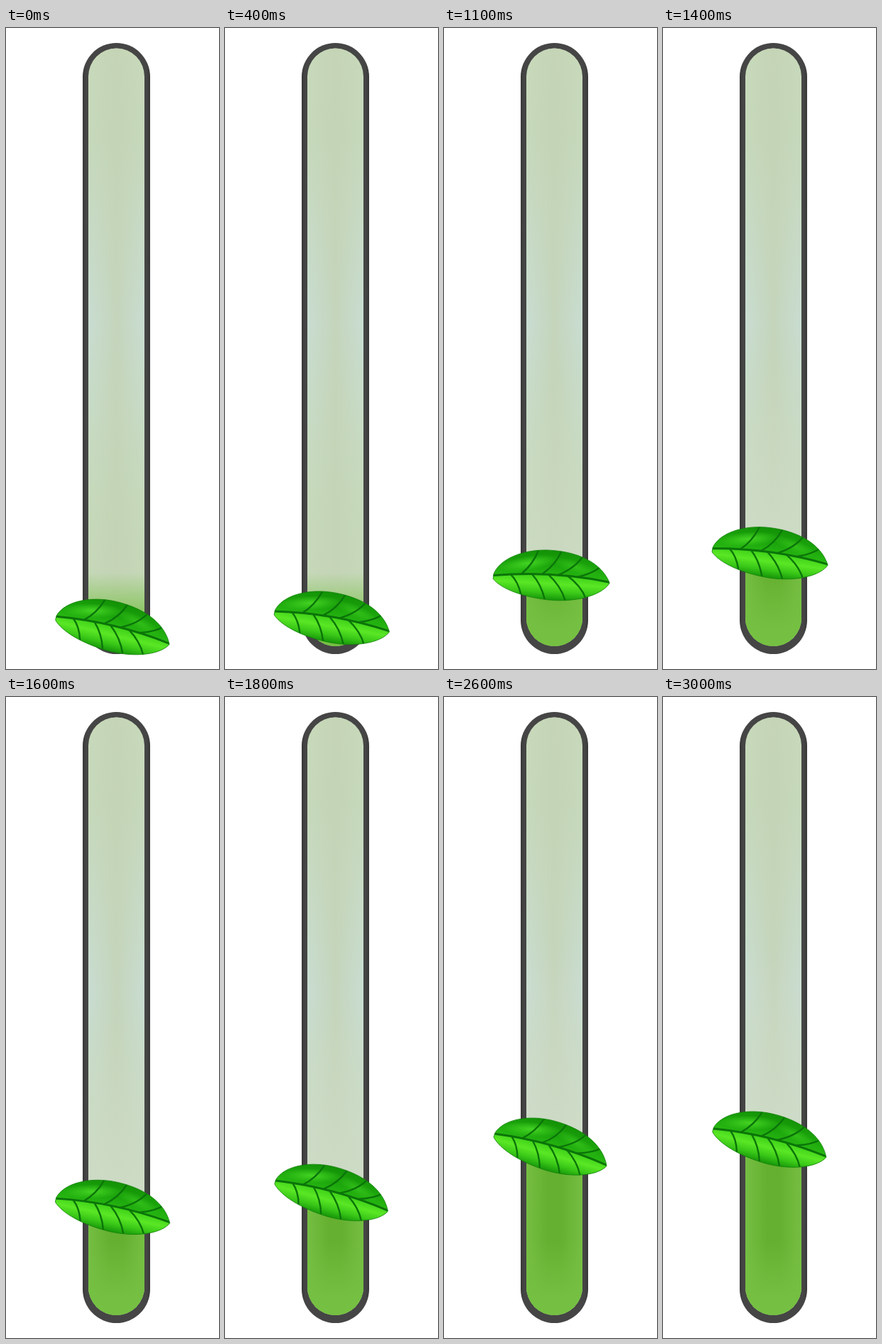
Recreate the animation shown at these times as an HTML page. Size 300 px wide and 900 px high, loop 4000 ms.

```html
<!DOCTYPE html>
<html lang="en">
<head>
<meta charset="utf-8">
<title>Leaf gauge</title>
<style>
html, body { margin: 0; width: 100%; height: 100%; overflow: hidden; background: #fff; }
svg { display: block; width: 300px; height: 900px; }
</style>
</head>
<body>
<svg viewBox="0 0 300 900">
  <defs>
    <linearGradient id="frame">
      <stop stop-color="#383838"/><stop offset=".05" stop-color="#454545"/>
      <stop offset=".95" stop-color="#454545"/><stop offset="1" stop-color="#383838"/>
    </linearGradient>
    <linearGradient id="glass" x2="0" y2="1">
      <stop stop-color="#c8dabb"/><stop offset=".15" stop-color="#c6d9bb"/>
      <stop offset=".46" stop-color="#c9ddd2"/>
      <stop offset=".75" stop-color="#c6dabb"/><stop offset="1" stop-color="#c3d6b4"/>
    </linearGradient>
    <linearGradient id="core">
      <stop stop-color="#c3d2b4" stop-opacity="0"/><stop offset=".5" stop-color="#c3d2b4" stop-opacity=".75"/>
      <stop offset="1" stop-color="#c3d2b4" stop-opacity="0"/>
    </linearGradient>
    <linearGradient id="haze" x2="0" y2="1">
      <stop stop-color="#d1dccb" stop-opacity="0"/><stop offset="1" stop-color="#d1dccb" stop-opacity=".75"/>
    </linearGradient>
    <linearGradient id="juice">
      <stop stop-color="#75be43"/><stop offset=".38" stop-color="#65b030"/>
      <stop offset=".62" stop-color="#65b030"/><stop offset="1" stop-color="#75be43"/>
    </linearGradient>
    <linearGradient id="base" x2="0" y2="1">
      <stop stop-color="#75c042" stop-opacity="0"/><stop offset=".75" stop-color="#75c042"/>
    </linearGradient>
    <linearGradient id="upper" x2="0" y2="1">
      <stop stop-color="#129006"/><stop offset=".5" stop-color="#1ca60c"/><stop offset="1" stop-color="#2cbf14"/>
    </linearGradient>
    <linearGradient id="lower" gradientUnits="userSpaceOnUse" x1="0" y1="-3" x2="0" y2="35">
      <stop stop-color="#38cc15"/><stop offset=".4" stop-color="#5ae725"/>
      <stop offset=".7" stop-color="#3ac818"/><stop offset="1" stop-color="#159509"/>
    </linearGradient>
    <radialGradient id="shine">
      <stop stop-color="#4bdc27" stop-opacity=".85"/><stop offset="1" stop-color="#4bdc27" stop-opacity="0"/>
    </radialGradient>
    <clipPath id="tube"><rect x="116" y="28.5" width="79" height="839.5" rx="39.5"/></clipPath>
    <path id="blade" d="M-82 4C-76 -18 -42 -35 -4 -35C38 -35 70 -20 82 6C74 22 42 35 4 35C-38 34 -70 23 -82 10Z"/>
    <clipPath id="edge"><use href="#blade"/></clipPath>
  </defs>

  <rect x="108" y="21" width="95" height="858" rx="47.5" fill="url(#frame)"/>
  <g clip-path="url(#tube)">
    <rect x="116" y="28" width="79" height="840" fill="url(#glass)"/>
    <rect x="116" y="28" width="79" height="840" fill="url(#core)"/>
    <rect id="mist" x="116" width="79" height="270" fill="url(#haze)"/>
    <g id="fill">
      <rect x="116" width="79" height="300" fill="url(#juice)"/>
    </g>
    <rect id="floor" x="116" y="765" width="79" height="105" fill="url(#base)"/>
  </g>

  <g id="leaf">
    <g clip-path="url(#edge)">
      <rect x="-84" y="-36" width="168" height="46" fill="url(#upper)"/>
      <ellipse cx="-34" cy="-15" rx="42" ry="10" transform="rotate(-12 -34 -15)" fill="url(#shine)"/>
      <ellipse cx="32" cy="-14" rx="34" ry="9" transform="rotate(14 32 -14)" fill="url(#shine)" opacity=".55"/>
      <path d="M-84 5Q0 -7 84 5V36H-84Z" fill="url(#lower)"/>
      <g fill="none" stroke="#0b7409" stroke-linecap="round">
        <path d="M-82 5Q0 -7 82 5" stroke-width="3"/>
        <path id="veins" stroke-width="2.4"/>
      </g>
    </g>
    <use href="#blade" fill="none" stroke="#128309" stroke-width=".8"/>
  </g>
</svg>
<script>
const $ = id => document.getElementById(id);

// Poses every 400 ms; the final entries lie past the resting point.
const heights = [840.5, 828, 798, 758, 716, 675.5, 641.5, 623.5, 620.5, 623.5];
const tilts = [13.4, 9.8, 3, 4.3, 11.8, 17, 16.7, 14.5, 13.5, 13.5];

// Root x, tip x, tip y
const veins = [
  [-43, -21, -33], [-14, 12, -35], [9, 43, -30], [37, 69, -17],
  [-58, -42, 29], [-28, -8, 34], [-5, 21, 34], [22, 50, 30]
];
$('veins').setAttribute('d', veins.map(([x, tx, ty]) =>
  `M${x} ${x * x / 1120 - 1}Q${x + (tx - x) * .7} ${ty * .4} ${tx} ${ty}`).join(''));

function spline(p, time) {
  const i = Math.floor(time / 400), u = time / 400 - i;
  const a = p[Math.max(0, i - 1)], b = p[i], c = p[i + 1], d = p[i + 2];
  return b + u / 2 * (c - a + u * (2 * a - 5 * b + 4 * c - d + u * (3 * (b - c) + d - a)));
}

function draw(now) {
  const time = Math.min(3000, Math.floor(now % 4000 / 100) * 100);
  const y = spline(heights, time);
  $('leaf').setAttribute('transform', `translate(151.7 ${y}) rotate(${spline(tilts, time)})`);
  $('fill').setAttribute('transform', `translate(0 ${y})`);
  $('mist').setAttribute('y', y - 270);
  $('mist').setAttribute('opacity', Math.min(1, (840.5 - y) / 100));
}

const start = performance.now();
function tick() {
  draw(performance.now() - start);
  requestAnimationFrame(tick);
}
tick();
</script>
</body>
</html>
```
